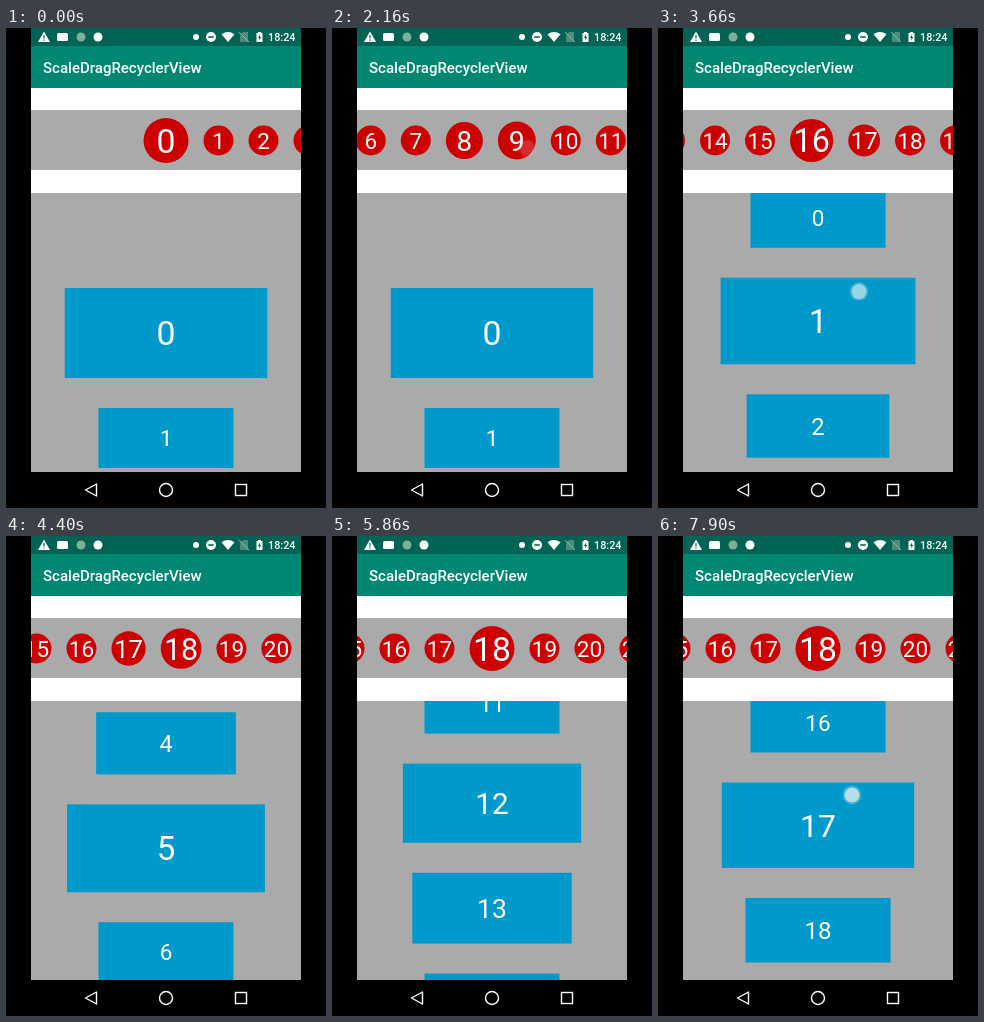
An HTML page that plays this animation: 320x480 px, repeating every 8000 ms.

```html
<!DOCTYPE html>
<html lang="en">
<head>
<meta charset="utf-8">
<title>Scaling lists</title>
<style>
html, body { margin: 0; width: 100%; height: 100%; overflow: hidden; background: #000; }
svg { display: block; width: 320px; height: 480px; font-family: Roboto, "Noto Sans", sans-serif; }
.num { font-size: 22.5px; text-anchor: middle; fill: #fff; }
</style>
</head>
<body>
<svg viewBox="0 0 320 480">
  <defs>
    <clipPath id="rowClip"><rect x="25" y="82" width="270" height="60"/></clipPath>
    <clipPath id="colClip"><rect x="25" y="165" width="270" height="279"/></clipPath>
  </defs>
  <rect width="320" height="480"/>
  <rect x="25" width="270" height="18" fill="#006353"/>
  <rect x="25" y="18" width="270" height="42" fill="#008772"/>
  <rect x="25" y="60" width="270" height="105" fill="#fff"/>
  <rect x="25" y="82" width="270" height="60" fill="#aaa"/>
  <rect x="25" y="165" width="270" height="279" fill="#aaa"/>

  <g fill="#fff">
    <path d="M38 3.5L44 14H32Z"/>
    <path d="M38 7v3.5M38 11.5v1.3" stroke="#006353" stroke-width="1.2"/>
    <rect x="51" y="5" width="11" height="8" rx="1.5"/>
    <circle cx="75" cy="9" r="4.5" fill="#7fae9b"/>
    <circle cx="92" cy="9" r="4.5"/>
    <circle cx="190" cy="9" r="3"/>
    <circle cx="205" cy="9" r="5"/>
    <path d="M202.3 9h5.4" stroke="#006353" stroke-width="1.6"/>
    <path d="M215.5 6.2Q222 1.8 228.5 6.2L222 14Z"/>
    <path d="M234 7l3-3h5v10h-8Z" fill="#4f8a7c"/>
    <path d="M233 4l10 10" stroke="#8fb5ab"/>
    <path d="M250.5 5h1.5v-1h3v1h1.5v9h-6Z"/>
    <path d="M254 6.5l-2 3.5h1.3v2.5l2-3.5h-1.3Z" fill="#006353"/>
    <text x="262" y="13" font-size="10.8" font-weight="500">18:24</text>
    <text x="37" y="45" font-size="15" font-weight="500">ScaleDragRecyclerView</text>
  </g>

  <g clip-path="url(#rowClip)"><g id="row"></g></g>
  <g clip-path="url(#colClip)"><g id="col"></g></g>

  <g id="touch" fill="#f2f8ee">
    <circle r="9.5" opacity=".25"/>
    <circle r="7.5" opacity=".65"/>
  </g>

  <g fill="none" stroke="#fff" stroke-width="1.4">
    <path d="M90.5 456v12L79.5 462Z" stroke-linejoin="round"/>
    <circle cx="160" cy="462" r="6.5"/>
    <rect x="229.5" y="456.5" width="11" height="11"/>
  </g>
</svg>
<script>
const LOOP = 8000;

// Screen updates: start time, then short updates before each 100 ms pause.
const BURSTS = [
  [270, '222223'], [1130, '222'], [1600, '222223'], [2460, '322322'], [3340, '222223'],
  [4200, '322322'], [5080, '322322'], [5960, '222223'], [6820, '322322'], [7700, '23']
];

const drag = u => u * u;
const bezier = (x, a, b) => 3 * x * (1 - x) * ((1 - x) * a + x * b) + x * x * x;

// Fling curve of the system scroller: cubic-bezier(.175, .5, .35, 1).
function fling(u) {
  let lo = 0, hi = 1;
  for (let i = 0; i < 30; i++) {
    const mid = (lo + hi) / 2;
    if (bezier(mid, 0.175, 0.35) < u) lo = mid; else hi = mid;
  }
  return bezier(hi, 0.5, 1);
}

// Each part: start time, duration, index aimed at (none = hold), easing.
// A new touch cuts the running fling short.
const ROW = [
  [250, 250, 1.3, drag], [500, 2260, 8.3, fling], [1490, 1, null, drag],
  [1600, 580, 8.64, drag], [2180, 1200, 10.24, fling],
  [2740, 240, 11.27, drag], [2980, 2100, 18, fling]
];
const COL = [
  [3472, 280, 1.5, drag], [3752, 1930, 6.155, fling],
  [5120, 285, 7.5, drag], [5405, 2490, 17.15, fling]
];

// Finger: start, end, opacity, position from the two list indices.
const TOUCHES = [
  [250, 505, 0.3, r => [264 - 45 * r, 120]],
  [1490, 2185, 0.25, r => [195 - 45 * (r - 8.53), 120]],
  [2740, 2985, 0.25, r => [250 - 45 * (r - 9.98), 120]],
  [3472, 3757, 0.85, (r, c) => [201, 264 - 90 * (c - 1.11)]],
  [5120, 5410, 0.85, (r, c) => [198, 340 - 90 * (c - 5.96)]],
  [7800, 8000, 1, () => [194, 259]]
];

const NS = 'http://www.w3.org/2000/svg';
const $ = id => document.getElementById(id);

function add(parent, tag, attrs) {
  const el = document.createElementNS(NS, tag);
  for (const k in attrs) el.setAttribute(k, attrs[k]);
  return parent.appendChild(el);
}

function makeList(parent, count, tag, attrs) {
  return Array.from({ length: count }, (_, i) => {
    const g = add(parent, 'g', {});
    add(g, tag, attrs);
    add(g, 'text', { class: 'num', y: 8.2 }).textContent = i;
    return g;
  });
}

const rowItems = makeList($('row'), 24, 'circle', { r: 15, fill: '#c00' });
const colItems = makeList($('col'), 22, 'rect',
  { x: -67.5, y: -30, width: 135, height: 60, fill: '#09c' });

// Updates are evenly spaced in the gesture but shown in uneven bursts.
function gestureTime(t) {
  const burst = BURSTS.filter(b => b[0] <= t).pop();
  if (!burst) return 0;
  let start = burst[0], last = start;
  for (const d of burst[1]) {
    const n = +d, len = 20 * n + 100, step = len / (n + 1);
    if (t < start + len) return start + Math.min(n, Math.floor((t - start) / 20)) * step;
    last = start + n * step;
    start += len;
  }
  return last;
}

function indexAt(parts, t) {
  let p = 0;
  parts.forEach(([start, time, to, ease], i) => {
    if (t < start) return;
    const next = parts[i + 1];
    const end = next ? Math.min(t, next[0]) : t;
    p += ((to ?? p) - p) * ease(Math.min(1, (end - start) / time));
  });
  return p;
}

// The items nearest the centre grow by up to half and push the rest apart.
function layout(items, p, centre, unit, place) {
  const j = Math.floor(p), f = p - j;
  const edge = centre - 0.75 * unit - 1.5 * unit * f;
  items.forEach((g, i) => {
    const scale = 1 + 0.5 * Math.max(0, 1 - Math.abs(i - p));
    let pos = edge + (i - j) * 1.5 * unit;
    if (i > j) pos += 0.5 * unit * (1 - f);
    if (i > j + 1) pos += 0.5 * unit * f;
    const mid = pos + unit * scale / 2;
    g.setAttribute('transform', `translate(${place(mid)}) scale(${scale})`);
  });
}

function draw(now) {
  const t = gestureTime(now % LOOP);
  const r = indexAt(ROW, t), c = indexAt(COL, t);
  layout(rowItems, r, 160, 30, x => [x, 112.5]);
  layout(colItems, c, 305, 60, y => [160, y]);

  const hit = TOUCHES.find(([a, b]) => t >= a && t < b);
  const touch = $('touch');
  touch.setAttribute('opacity', hit ? hit[2] : 0);
  if (hit) touch.setAttribute('transform', `translate(${hit[3](r, c)})`);
}

const begin = performance.now();
function tick() {
  draw(performance.now() - begin);
  requestAnimationFrame(tick);
}
tick();
</script>
</body>
</html>
```
